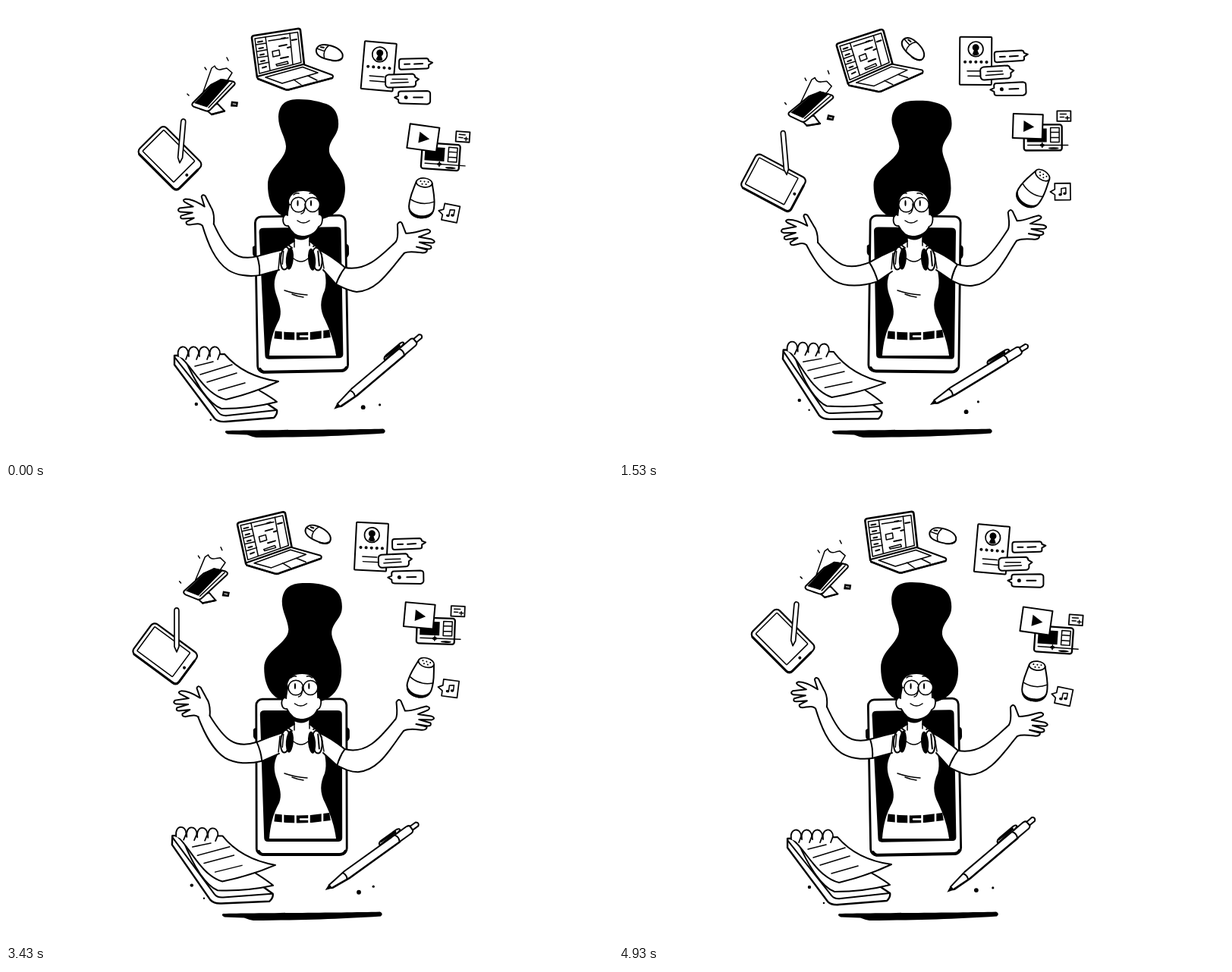
These frames come from a looping animation (800 px wide and 600 px high, 4.96 s). An HTML page:

```html
<!DOCTYPE html>
<html lang="en">
<head>
<meta charset="utf-8">
<title>Juggling devices</title>
<style>
html, body { margin: 0; width: 100%; height: 100%; overflow: hidden; background: #fff; }
svg { display: block; width: 100vw; height: 100vh; }
.ink { fill: #000; stroke: none; }
.thin { stroke-width: 1.5; }
.bold { stroke-width: 2.6; }
.bare { stroke: none; }
.line { fill: none; }
.gap { fill: none; stroke: #fff; }
</style>
</head>
<body>
<!-- data-move: pivot x, pivot y, shift x, shift y, turn in degrees, lead in ms -->
<svg viewBox="0 0 800 600" fill="#fff" stroke="#000" stroke-width="2" stroke-linecap="round" stroke-linejoin="round">

  <g data-move="390 562 -8 0 0 0">
    <path class="ink" d="M290 560C330 559 440 559 497 557.500Q502 560 498 563.500C440 567 400 568.500 330 569Q324 568 318 565.500L292 564.500Q287 562 290 560Z"/>
  </g>

  <!-- laptop -->
  <g data-move="370 72 -33 3 -9 0">
    <path class="bold" d="M324 42Q324 39.500 327 39L384 30Q387.500 29.500 388 32L393 77L331 94Z"/>
    <path class="thin" d="M328 43L384.500 34.500L389 74.500L334 89Z"/>
    <path class="thin line" d="M342 41L348 85M329.500 51L343 49M331 60L344.500 57.500M332 68L345.500 66M333.500 77L347 74M374 36L378 77M346 46L372 42"/>
    <path class="line" d="M332 47.500L338 46.500M333.500 56L339 55M335 64.500L340 63.500M336 73L341 72M338 81.500L343 80M362 69L372 67M360 53L370 51M371 55L375 54M377 45L383 44M363 43L368 42"/>
    <path class="thin" d="M351 60L360 58L361 65L352 67ZM356 77L371 73L372 76L357 79Z"/>
    <path d="M331 93L392 77L430 91Q432 93 430 95L374 110Q371 111 368 110L332 96Z"/>
    <path class="line bold" d="M332 96L368 110Q371 111 374 110L430 95"/>
    <path class="thin line" d="M342 94L391 80.500L411 88L364 102M342 94L364 102M379 97L389 104M398 92L410 98"/>
  </g>

  <!-- mouse -->
  <g data-move="428 61.500 -38 -5 28 100">
    <g transform="translate(428 61.500) rotate(13)">
      <path d="M-18 0C-17 -7 -9 -9.500 0 -9C10 -8.500 18 -5 18 2C18 7.500 10 9.500 0 9.500C-10 9.500 -18 7 -18 0Z"/>
      <path class="line thin" d="M-3 -9C-8 -3 -8 4 -5 9M-17 -1L-7 0"/>
      <path class="line" d="M-13 -4L-9 -4.500M6 9.500Q14 8.500 17 4"/>
    </g>
  </g>

  <!-- profile card and messages -->
  <g data-move="491 80 -21 -7 -4.500 40">
    <g transform="translate(491.500 80) rotate(5)">
      <rect x="-21" y="-32" width="42" height="63" rx="1"/>
      <circle cy="-16" r="9.800" stroke-width="1.700"/>
      <circle class="ink" cy="-18" r="4.500"/><path class="ink" d="M-2 -15H2L4.500 -9Q0 -6 -4.500 -9Z"/>
      <path class="line" stroke-width="4" stroke-dasharray="0.100 7" d="M-14 1H15"/>
      <path class="line thin" d="M-11 13H8M-10 19.500H12"/>
    </g>
  </g>
  <g data-move="540 77 -23 -10 -2 100">
    <path d="M522 70L555 69.500Q558 70 558 73L563 75L558 78V81Q558 83 555 83L522 84Q519 84 519 81V73Q519 70 522 70Z"/>
    <path class="line" d="M526 77H533M539 77L550 76.500"/>
  </g>
  <g data-move="522 99 -23.500 -10.500 -2 100">
    <path d="M505 91L537 90Q540 91 540 94L545 97L541 100V104Q540 107 537 107L506 108Q502 108 501 104V95Q501 92 505 91Z"/>
    <path class="line thin" d="M510 97H530M508 102L531 101"/>
  </g>
  <g data-move="538 121 -22.500 -11 -2 100">
    <path d="M521 113L556 112.500Q560 113 560 116V126Q560 129 556 130L522 129Q518 129 518 126V124L513 121L518 119V116Q518 113 521 113Z"/>
    <path class="line" d="M538 121H550"/><circle class="ink" cx="528" cy="121" r="2.500"/>
  </g>

  <!-- video editor -->
  <g data-move="573 199 -14 -25 -4 40">
    <g transform="translate(573 199) rotate(4)">
      <rect x="-25" y="-17" width="50" height="34" rx="3" stroke-width="2.300"/>
      <rect class="ink" x="-21" y="-12" width="26" height="18"/>
      <path class="thin" d="M10 -13H21.500V6H10ZM10 -7H21.500M10 0H21.500"/>
      <path class="line thin" d="M-20 10H33M-1 7V13"/>
      <ellipse class="ink" cx="-1" cy="10" rx="3" ry="2"/><ellipse class="ink" cx="14" cy="14" rx="7" ry="1.300"/>
    </g>
  </g>
  <g data-move="549.500 174 -11 -15 -6 40">
    <g transform="translate(549.500 174) rotate(8)">
      <rect x="-19" y="-16" width="39" height="32"/><path class="ink" d="M-5 -7.500L9 0.500L-5 7.500Z"/>
    </g>
  </g>
  <g data-move="602.500 173.500 -15.500 -27 -4 80">
    <g transform="translate(602.500 173.500) rotate(4)">
      <rect x="-9" y="-7" width="18" height="13.500" stroke-width="1.800"/>
      <path class="line thin" d="M-5 -3H3M-5 1H0M2 2H7M4.500 0V4.500"/>
    </g>
  </g>

  <!-- speaker and note -->
  <g data-move="549 254 -2 -13 27 130">
    <g transform="translate(549 254) rotate(5)">
      <path d="M-10.500 -21C-13 -10 -17 -2 -16.500 12C-16 22 -8 26 0 26C8 26 16 22 16.500 12C17 -2 13 -10 10.500 -21Z"/>
      <path class="ink" d="M-16.500 13C-13 21 -6 23 0 23C6 23 13 21 16.500 13C17 23 8 27 0 27C-9 27 -17 23 -16.500 13Z"/>
      <path class="line thin" d="M-16 3Q0 11 16 3"/>
      <ellipse cy="-20.500" rx="10.500" ry="6" stroke-width="1.700"/>
      <path class="line" stroke-dasharray="0.100 5" d="M-5 -22H6M-2.500 -18.500H4"/>
    </g>
  </g>
  <g data-move="586 274.500 -1.500 -28 -12 130">
    <g transform="translate(586 274.500) rotate(12)">
      <path stroke-width="1.700" d="M-10 -11H10.500V11H-10V4L-16 0L-10 -3Z"/>
      <path class="line thin" d="M-1.500 4V-4L4.500 -5V2"/>
      <ellipse class="ink" cx="-3" cy="4" rx="2.200" ry="1.700"/><ellipse class="ink" cx="3" cy="2.500" rx="2.200" ry="1.700"/>
    </g>
  </g>

  <!-- phone on a stand -->
  <g data-move="272 115 -20.500 15 6 0">
    <path d="M259 133L271 143L288 138.500L279 129Z"/>
    <path class="line" stroke-width="2.400" d="M271 143L288 138.500"/>
    <path class="line thin" d="M262 81L264 84M291 68L293 72M239 116L241 118"/>
    <path class="thin" d="M260 113L271 82L275 79Q278 86 286 83L291 82L298 88L287 106Z"/>
    <path d="M246 128Q244 131 248 133L264 138.500Q268 139 270 136L301 104Q303 101 299 99.500L284 97L270 104Z"/>
    <path class="ink" d="M248 128L271 104L283 96L296 98L265 133.500Z"/>
    <path class="line thin" d="M267 134L298 101"/>
    <path class="ink" d="M297 125.500L306 126.500L305 133L296 132.500Z"/>
    <path class="gap" stroke-width="1" d="M299 129L303 129.500"/>
  </g>

  <!-- tablet and stylus -->
  <g data-move="216 200.500 -12.500 32.500 -17 0">
    <g transform="translate(216 200.500) rotate(45)">
      <rect x="-37" y="-25" width="74" height="50" rx="6" stroke-width="2.200"/>
      <path class="line" stroke-width="3" d="M-32 25H31Q37 25 37 19V-15"/>
      <rect class="thin" x="-32" y="-20.500" width="58" height="39.500" rx="1"/>
      <circle class="ink" cx="31.500" cy="0" r="2"/>
    </g>
  </g>
  <g data-move="231.500 178 -13 15.500 -10 0">
    <path transform="translate(231.500 178) rotate(5)" stroke-width="1.700" d="M-3 -25Q-3 -29 0 -29Q3 -29 3 -25L3 22L0 29L-3 22Z"/>
  </g>

  <!-- notepad -->
  <g data-move="290 498 -8 -3 4 0">
    <path stroke-width="2.400" d="M222 461L222 473L275 544Q280 549 290 548L353 543Q358 538 357 533L300 495L270 459Z"/>
    <path class="line" d="M222 463L280 536Q284 541 292 540L356 533"/>
    <path d="M236 466C252 502 268 525 284 531C312 531 338 527 357 522C350 516 336 508 322 500Z"/>
    <path d="M227 461C243 470 260 512 290 519C315 513 340 504 359 495C330 491 306 480 288 459Z"/>
    <path class="line thin" d="M249 475L273 469M256 486L298 473M265 496L304 484M280 507L315 497"/>
    <g id="rings" stroke-width="1.800"></g>
  </g>
  <g data-move="251 525 -13 -5 0 40"><circle class="ink" cx="251" cy="525" r="2.200"/></g>
  <g data-move="270 546 -19 -13 0 40"><circle class="ink" cx="270" cy="546" r="1.200"/></g>

  <!-- pen -->
  <g data-move="491 482 -15.500 4 8.800 0">
    <g transform="translate(433 531) rotate(-40.200)">
      <path d="M7 -2.500L34 -5.500H135Q139 -5 139 -2.500V2.500Q139 5 135 5.500H34L7 2.500Z"/>
      <path d="M139 -3H148Q152 0 148 3H139Z"/>
      <path class="ink" d="M-1 0L8 -3.500V3.500Z"/>
      <path class="line" d="M31 -5Q34 0 31 5M116 -5Q119 0 116 5M9 3.500L34 6H116"/>
      <path d="M92 -6Q92 -10 98 -10L122 -10Q127 -9 125 -6.500L119 -5.500L118 -7.500Z"/>
      <path class="line bold" d="M96 -9L119 -8.500"/>
    </g>
  </g>
  <g data-move="471 529 -13 6 0 60"><circle class="ink" cx="471" cy="529" r="2.900"/></g>
  <g data-move="493 526 -19 -4 0 60"><circle class="ink" cx="493" cy="526" r="1.600"/></g>

  <!-- large phone -->
  <g data-move="389 380 0 0 1.700 0">
    <g transform="rotate(-1 389 380)">
      <path class="ink" d="M326 317Q328 314 331 316V330Q326 330 326 325ZM448 314Q453 315 453 319V328Q452 333 448 333Z"/>
      <rect x="330" y="277" width="119" height="205" rx="8" stroke-width="2.800"/>
      <path class="line" stroke-width="4" d="M333 478Q335 482 340 482H439Q445 482 447 478"/>
      <path class="ink" d="M341 292H437Q443 292 443 297V460Q443 465 438 465H345Q340 465 340 460L335 297Q335 292 341 292Z"/>
    </g>
  </g>

  <!-- body -->
  <path class="bare" d="M380 300V311L363 322L358 350C352 362 353 372 357 383C361 394 364 404 360 414C352 428 348 445 347 461H435C433 445 428 430 421 415C413 400 414 388 420 375C424 362 419 350 420 345L413 322L400 311V300Z"/>
  <path class="bare" id="skinL"/><path class="bare" id="skinR"/>
  <path class="line" id="armL"/><path class="line" id="armR"/>
  <path id="sleeveL"/><path id="sleeveR"/>
  <path class="line thin" d="M367 375Q381 380 397 381M377 380Q384 383 392 384"/>
  <path class="line" stroke-width="10" stroke-linecap="butt" d="M354 433.500Q390 438 427 432"/>
  <path class="gap" stroke-width="2.600" d="M365 428V442M381.500 428V443M399.500 428V443M417 427V441M388 435.500H398"/>
  <path class="line thin" d="M379 333Q389 341 398 333M380 304V318M400 302V316M361 326L359 347M416 327L419 346"/>

  <!-- headphones -->
  <path class="line" d="M366 319Q370 311 380 310M400 310Q410 312 414 320M372 315L377 319M405 317L411 313"/>
  <g transform="rotate(5 372 332)">
    <ellipse cx="368" cy="333" rx="6" ry="15"/><ellipse class="ink" cx="374" cy="333" rx="5" ry="14.500"/>
    <path class="line thin" d="M365 324V341"/>
  </g>
  <g transform="rotate(-5 406 333)">
    <ellipse cx="410" cy="334" rx="6.500" ry="15"/><ellipse class="ink" cx="403" cy="334" rx="5" ry="14.500"/>
    <path class="line" d="M412 324V343"/>
  </g>

  <!-- head -->
  <path class="ink" d="M377 297C384 304 396 304 402 298L400 304C396 309 386 310 380 306Z"/>
  <path class="ink" id="hair"/>
  <g data-move="390 275 -3.500 0 0 0">
    <path stroke-width="1.800" d="M372 257C374 248 381 243 392 243C404 243 411 249 413 261L415 276C418 276 418 289 412 291C409 299 400 304 390 304C383 304 377 300 372 290C364 291 363 278 369 275L371 276Z"/>
    <path class="ink" d="M371 276L370 264L372 254L374 262ZM412 276L411 256L416 262L417 275Z"/>
  </g>
  <g class="thin" data-move="394 262 -7 0 0 0">
    <circle cx="385.500" cy="262" r="9.800"/>
    <ellipse class="ink" cx="384.500" cy="260" rx="1.100" ry="4"/>
    <path class="line" d="M375 262L370 261M379 249Q382 246 386 247M400 247Q404 246 407 249"/>
    <path class="line" d="M394 261C395 266 393 274 389 274M384 283Q392 289 400 283"/>
  </g>
  <g class="thin" data-move="404 262 -5.300 0 0 0">
    <circle cx="404" cy="262" r="9.500"/>
    <ellipse class="ink" cx="402" cy="260" rx="1.100" ry="4"/>
  </g>

  <!-- hands -->
  <g data-move="256 275 -12.500 25.500 -4 60">
    <path d="M274 287C275 278 274 270 270 264L263 250Q259 247 258 251L262 264C256 260 246 254 237 254Q232 255 236 258L247 264L229 266Q225 269 230 271L246 272L231 276Q229 280 234 280L248 279L238 284Q237 288 242 288C250 287 254 285 259 289"/>
  </g>
  <g data-move="538 305 -2 -17 -4 60">
    <path d="M514 311C518 305 516 295 516 288Q519 283 522 287L527 300C536 301 547 296 556 295Q562 297 557 300L544 305L561 308Q568 311 562 313L545 312L560 317Q562 321 556 321L541 318L555 322Q555 326 549 326C541 325 532 323 525 326"/>
  </g>
</svg>

<script>
const LOOP = 4960;
const byId = id => document.getElementById(id);
const wave = ms => (1 - Math.cos(2 * Math.PI * ms / LOOP)) / 2;
// 0 near the right-hand pose, about 1 near the left-hand pose
const sway = ms => (wave(ms + 350) - 0.048) / 0.815;

const movers = [...document.querySelectorAll('[data-move]')].map(el =>
  ({ el, move: el.dataset.move.split(' ').map(Number) }));

const sleeves = {
  sleeveL: ['M366 321Q348 325 331 330Q335 342 334 355L360 348',
            'M364 321Q347 328 330 338Q337 349 341 363L360 350'],
  sleeveR: ['M412 321Q430 330 447 345Q439 355 435 367L418 348',
            'M412 321Q430 328 446 341Q440 350 438 362L418 348']
};
// Each arm is two edges: from shoulder to wrist, then back.
const arms = {
  L: ['M331 330C300 338 288 318 274 287M259 289C266 312 275 336 293 348C304 355 320 357 334 355',
      'M330 338C302 349 288 344 262 311M247 314C256 332 268 352 284 362C300 371 322 369 341 363'],
  R: ['M447 345C474 350 492 332 514 311M525 326C506 348 490 376 462 377C452 376 443 371 435 367',
      'M446 341C474 350 490 330 512 296M524 310C510 330 496 366 466 369C454 370 446 366 438 362']
};

function mix([from, to], k) {
  const ends = to.match(/[\d.]+/g);
  let i = 0;
  return from.replace(/[\d.]+/g, n => (+n + (ends[i++] - n) * k).toFixed(2));
}

// The base follows the body while the top trails behind it.
function hairPath(ms) {
  const base = -9.5 * sway(ms);
  const top = 1.9 - 3 * Math.cos(2 * Math.PI * (ms - 700) / LOOP);
  const drop = sway(ms);
  const b = x => (x + base).toFixed(2);
  const s = x => (x + top).toFixed(2);
  const m = x => (x + top * 0.7).toFixed(2);
  const y = (v, amount) => (v + drop * amount).toFixed(2);
  return `M${b(367)} 278C${b(352)} 272 ${b(345)} 256 ${b(345)} 236` +
    `C${b(345)} 212 ${m(369)} 204 ${m(369)} 185C${m(368)} 171 ${s(359)} 163 ${s(359)} ${y(146, 4)}` +
    `C${s(360)} ${y(128, 6)} ${s(370)} ${y(123, 3)} ${s(386)} ${y(123, 2)}C${s(402)} ${y(123, 1)} ${s(412)} ${y(126, -1)} ${s(422)} 129` +
    `C${s(434)} 133 ${s(439)} 145 ${s(438)} 158C${s(437)} 172 ${m(425)} 177 ${m(426)} 192` +
    `C${m(428)} 206 ${b(447)} 213 ${b(447)} 240C${b(447)} 262 ${b(436)} 276 ${b(417)} 281Z`;
}

byId('rings').innerHTML = [233, 247, 261, 275].map(x =>
  `<path d="M${x - 6} 462C${x - 9} 446 ${x + 7} 446 ${x + 7} 458L${x + 4} 466"/>`).join('');

function render(ms) {
  for (const { el, move: [cx, cy, dx, dy, turn, lead] } of movers) {
    const k = sway(ms + lead);
    el.setAttribute('transform', `translate(${dx * k} ${dy * k}) rotate(${turn * k} ${cx} ${cy})`);
  }
  const k = sway(ms + 40);
  for (const id in sleeves) byId(id).setAttribute('d', mix(sleeves[id], k));
  for (const side in arms) {
    const edges = mix(arms[side], k);
    byId('arm' + side).setAttribute('d', edges);
    byId('skin' + side).setAttribute('d', 'M' + edges.slice(1).replace('M', 'L') + 'Z');
  }
  byId('hair').setAttribute('d', hairPath(ms));
}

const start = performance.now();
function tick() {
  render((performance.now() - start) % LOOP);
  requestAnimationFrame(tick);
}
tick();
</script>
</body>
</html>
```
